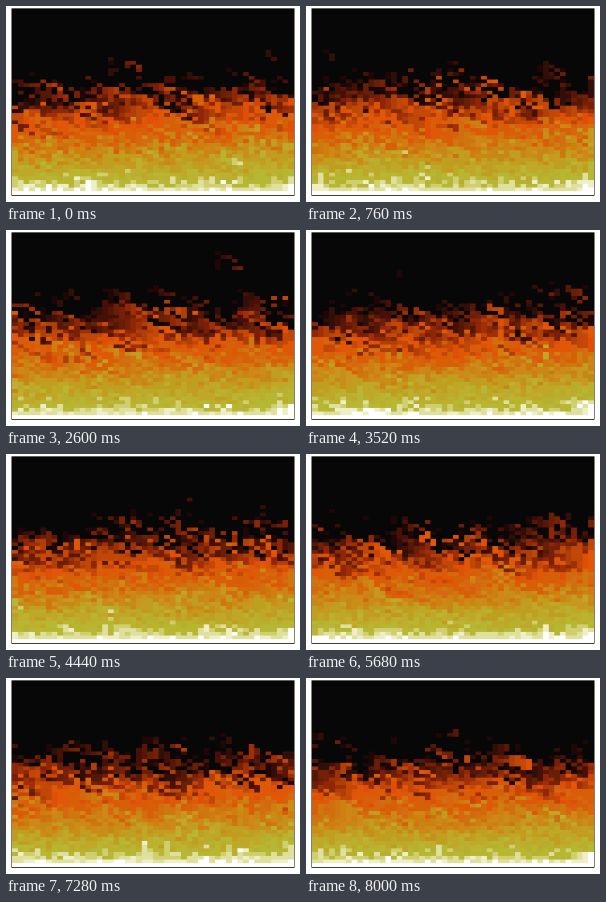
An HTML page with a canvas that plays this animation: 294x196 px, repeating every 8040 ms.

```html
<!DOCTYPE html>
<html lang="en">
<head>
<meta charset="utf-8">
<title>Fire</title>
<style>
  html, body { margin: 0; width: 100%; height: 100%; overflow: hidden; background: #fff; }
  canvas { display: block; }
</style>
</head>
<body>
<canvas id="stage" width="294" height="196"></canvas>
<script>
const ctx = document.getElementById('stage').getContext('2d');
const COLS = 50, ROWS = 50, STEP = 40, FRAMES = 201, WARMUP = 120;
const LEFT = 6.25, TOP = 2.75, WIDTH = 281.5, HEIGHT = 186.25, LINE = 0.75;
const CELL_W = 9, CELL_H = 6;

const palette = (
  '070707 1f0707 2f0f07 470f07 571707 671f07 771f07 8f2707 9f2f07 af3f07 ' +
  'bf4707 c74707 df4f07 df5707 df5707 d75f07 d75f07 d7670f cf6f0f cf770f ' +
  'cf7f0f cf8717 c78717 c78f17 c7971f bf9f1f bf9f1f bfa727 bfa727 bfaf2f ' +
  'b7af2f b7b72f b7b737 cfcf6f dfdf9f efefc7 ffffff'
).split(' ').map(hex => '#' + hex);

let seed = 20417;
function random() {
  seed = (seed + 0x6d2b79f5) | 0;
  let t = Math.imul(seed ^ (seed >>> 15), 1 | seed);
  t = (t + Math.imul(t ^ (t >>> 7), 61 | t)) ^ t;
  return ((t ^ (t >>> 14)) >>> 0) / 4294967296;
}

// Heat rises one row per step, cooling and drifting left by the same amount.
function spread(heat) {
  for (let col = 0; col < COLS; col++) {
    for (let row = 0; row < ROWS - 1; row++) {
      const i = row * COLS + col;
      const decay = Math.floor(random() * 3);
      if (i >= decay) heat[i - decay] = Math.max(0, heat[i + COLS] - decay);
    }
  }
}

const heat = new Uint8Array(COLS * ROWS);
heat.fill(palette.length - 1, COLS * (ROWS - 1));
for (let n = 0; n < WARMUP; n++) spread(heat);

const frames = Array.from({ length: FRAMES }, () => {
  spread(heat);
  return heat.slice();
});

// Cells are painted large, then scaled down so that their edges blend.
const sheet = document.createElement('canvas');
sheet.width = COLS * CELL_W;
sheet.height = ROWS * CELL_H;
const paint = sheet.getContext('2d');
ctx.imageSmoothingQuality = 'high';

function draw(cells) {
  cells.forEach((value, i) => {
    paint.fillStyle = palette[value];
    paint.fillRect(i % COLS * CELL_W, Math.floor(i / COLS) * CELL_H, CELL_W, CELL_H);
  });
  ctx.fillStyle = '#fff';
  ctx.fillRect(0, 0, 294, 196);
  ctx.fillStyle = '#000';
  ctx.fillRect(LEFT - LINE, TOP - LINE / 2, WIDTH + 2 * LINE, HEIGHT + 1.5 * LINE);
  ctx.drawImage(sheet, LEFT, TOP, WIDTH, HEIGHT);
}

const start = performance.now();
let shown = -1;
function tick() {
  const n = Math.floor((performance.now() - start) / STEP) % FRAMES;
  if (n !== shown) draw(frames[shown = n]);
  requestAnimationFrame(tick);
}
tick();
</script>
</body>
</html>
```
